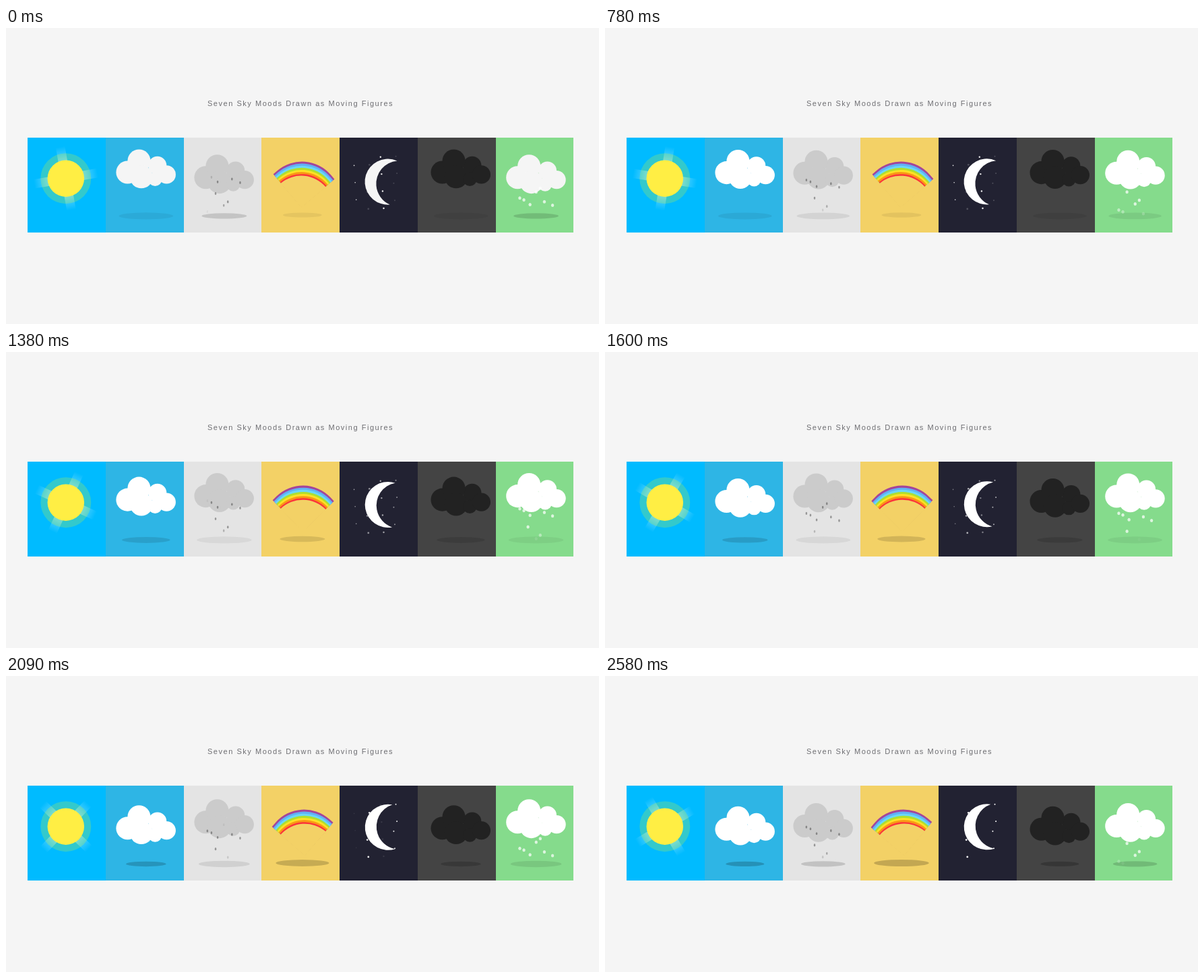
These frames come from a looping animation (880x440 px, 2.68 s). An HTML page with a canvas:

```html
<!DOCTYPE html>
<html lang="en">
<head>
<meta charset="utf-8">
<title>Sky moods</title>
<style>
  html, body { margin: 0; width: 100%; height: 100%; overflow: hidden; background: #f5f5f5; }
  canvas { position: absolute; left: 0; top: 0; width: 880px; height: 440px; }
  h1 {
    position: absolute; left: 299px; top: 104px; margin: 0;
    font: 11px/16px "Liberation Sans", Arial, sans-serif;
    letter-spacing: 1.53px; white-space: nowrap; color: #6e6e72;
  }
</style>
</head>
<body>
<canvas id="sky" width="880" height="440"></canvas>
<h1>Seven Sky Moods Drawn as Moving Figures</h1>
<script>
const g = document.getElementById('sky').getContext('2d');
const LOOP = 2.68, LAST = 2.58, S = 0.681, TAU = Math.PI * 2;
const TILES = ['#00bbff', '#2eb5e5', '#e4e4e4', '#f3d166', '#222232', '#444', '#85db8c'];
const BANDS = ['#fb323c', '#f99716', '#fee124', '#afdf2e', '#6ad7f8', '#60b1f5', '#a3459b'];

// [x, y, radius] of the puffs, relative to the leftmost one
const PUFFS = [[0, 0, 25], [65, -15, 20], [25, -25, 25], [30, 10, 25], [60, 15, 15], [85, 5, 20]];

// [x, share of the cycle at which the fall starts]
const DROPS = [[30, 0], [40, .95], [50, .5], [55, .82], [70, .17], [80, .27], [90, .9], [110, .8]];

const mix = (a, b, k) => a + (b - a) * k;
const fract = x => x - Math.floor(x);

function easeInOut(x) {
  const a = x ** 1.75, b = (1 - x) ** 1.75;
  return a / (a + b);
}

// 0 at the peak, 1 at rest, half a cycle of 2.5 s
const swing = (clock, peak) => easeInOut(Math.min(1, Math.abs(clock - peak) / 2.5));

function oval(x, y, rx, ry = rx) {
  g.beginPath();
  g.ellipse(x, y, rx, ry, 0, 0, TAU);
  g.fill();
}

function turned(x, y, angle, draw) {
  g.save();
  g.translate(x, y);
  g.rotate(angle * Math.PI / 180);
  draw();
  g.restore();
}

function sun(angle) {
  const half = 70 * S, w = 20 * S;
  const ray = g.createLinearGradient(0, -half, 0, half);
  ray.addColorStop(0, 'rgba(255,255,255,0)');
  ray.addColorStop(.5, 'rgba(255,255,255,.8)');
  ray.addColorStop(1, 'rgba(255,255,255,0)');
  for (const a of [angle, angle + 90]) {
    turned(88.8, 223.7, a, () => {
      g.fillStyle = ray;
      g.fillRect(-w / 2, -half, w, half * 2);
    });
  }
  g.fillStyle = 'rgba(255,255,0,.2)';
  oval(88.8, 223.7, 55 * S);
  g.fillStyle = '#fe4';
  oval(88.8, 223.7, 40 * S);
}

function shadow(x, y, scale, k) {
  g.fillStyle = `rgba(0,0,0,${mix(.055, .2, k)})`;
  oval(x, y, 60 * S * scale, 7.5 * S * scale);
}

function cloud(x, k, color) {
  shadow(x + 27.4, 279.4, mix(1, .7, k), k);
  const y = mix(214.1, 227.7, k);
  g.fillStyle = color;
  for (const [dx, dy, r] of PUFFS) oval(x + dx * S, y + dy * S, r * S);
}

function fall(x, y, cycles, rgb, alpha, rx, ry) {
  for (const [dx, start] of DROPS) {
    const age = fract(cycles - start);
    const shown = Math.min(1, age * 20, (1 - age) * 4);
    g.fillStyle = `rgba(${rgb},${alpha * shown})`;
    oval(x + dx * .608, y + mix(30, 118, age) * .61, rx, ry);
  }
}

function rainbow(k) {
  shadow(439.9, 278, mix(.7, 1, k), k);
  turned(441, 233.7, mix(50, 40, k), () => {
    g.scale(S, S);
    g.translate(-35, -35);
    const band = (spread, shift, color) => {
      const from = -spread - shift, size = 70 + 2 * spread;
      g.fillStyle = color;
      g.beginPath();
      g.roundRect(from, from, size, size, [70 + spread, 0, 0, 0]);
      g.fill();
    };
    for (let i = BANDS.length; i > 0; i--) band(1.9 * i - 1, 1.9 * i, BANDS[i - 1]);
    band(0, 0, TILES[3]);
  });
}

function night(k, white) {
  g.fillStyle = white;
  // evenly scattered stars, every second one fades out while the others light up
  for (let i = 1; i <= 15; i++) {
    g.globalAlpha = i % 2 ? mix(.15, 1, k) : 1 - k;
    oval(515 + 80 * fract(i * .7549), 179 + 91 * fract(i * .5698), .8 + .2 * (i % 4));
  }
  g.globalAlpha = 1;

  const r = 50 * S, d = 25 * S, a = Math.acos(d / 2 / r);
  turned(549.8, 225.8, mix(10, -5, k), () => {
    g.beginPath();
    g.arc(d, 0, r, a, -a);
    g.arc(d * 2, 0, r, Math.PI + a, Math.PI - a, true);
    g.fill();
  });
}

function draw(t) {
  const opening = t < .06;
  const time = opening ? 0 : Math.min(t, LAST);
  const white = opening ? '#f5f5f5' : '#fff';
  const clock = time + .0169 * time ** 3; // playback gains speed
  const early = swing(clock, .31), late = swing(clock, 1.4);

  g.clearRect(0, 0, 880, 440);
  TILES.forEach((color, i) => {
    const edge = n => Math.round(32.3 + n * 810 / 7);
    g.fillStyle = color;
    g.fillRect(edge(i), 163, edge(i + 1) - edge(i), 141);
  });

  sun(clock * 24 - 9.9);
  cloud(180.4, early, white);
  cloud(296.4, late, '#cbcbcb');
  fall(280.6, 202.5, .97 + clock / .7, '0,0,0', .34, 1.3, 2.1);
  rainbow(early);
  night(early, white);
  cloud(647.5, early, '#222');
  cloud(759.2, late, white);
  fall(744.2, 207.7, .5 + .39 * clock + .037 * clock ** 2, '255,255,255', .72, 2.2, 2.5);
}

function frame() {
  draw(performance.now() / 1000 % LOOP);
  requestAnimationFrame(frame);
}
frame();
</script>
</body>
</html>
```
